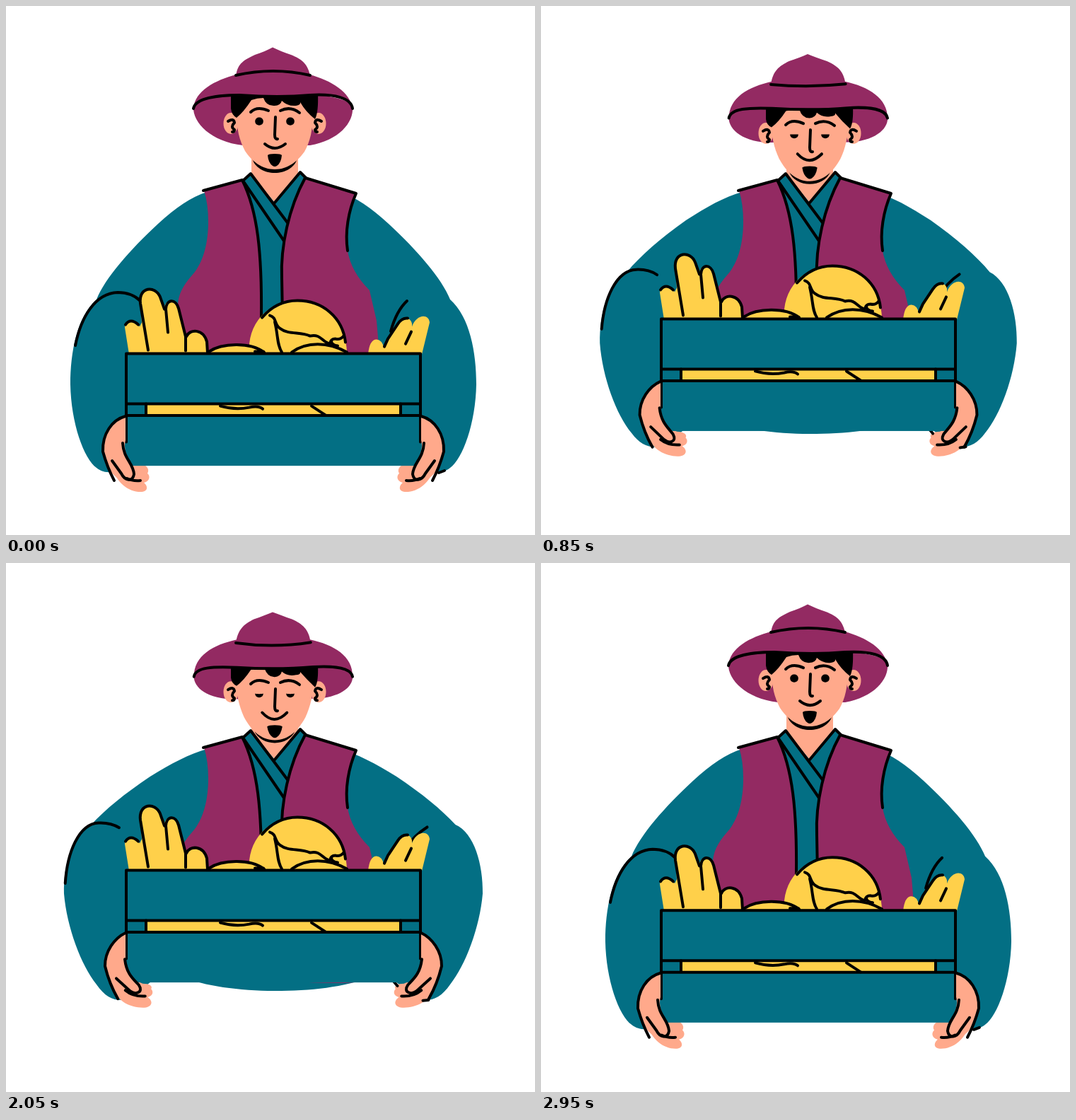
Write an HTML page with a canvas that moves like this. It is 748 by 748 pixels and loops after 3 s.

```html
<!DOCTYPE html>
<html lang="en">
<head>
<meta charset="utf-8">
<title>Farmer lifting a crate</title>
<style>
html, body { margin: 0; width: 100%; height: 100%; overflow: hidden; background: #fff; }
canvas { display: block; width: 748px; height: 748px; }
</style>
</head>
<body>
<canvas id="stage" width="748" height="748"></canvas>
<script>
const ctx = document.getElementById('stage').getContext('2d');
const TEAL = '#036f84', PLUM = '#932a62', SKIN = '#ffa98b', GOLD = '#ffd04a', INK = '#000';
const LOOP = 3000, STEP = 50, LIFT = 82;
let k = 0; // pose blend: 0 is low, a little over 1 is fully raised

// Blend two path strings with the same commands.
function mix(a, b) {
  const to = b.match(/-?[\d.]+/g);
  let i = 0;
  return a.replace(/-?[\d.]+/g, n => +n + (to[i++] - n) * k);
}
const path = (a, b) => new Path2D(b ? mix(a, b) : a);
function fill(color, a, b) {
  ctx.fillStyle = color;
  ctx.fill(path(a, b));
}
function line(a, b, w = 4) {
  ctx.lineWidth = w;
  ctx.stroke(path(a, b));
}
function shifted(dx, dy, draw) {
  ctx.save();
  ctx.translate(dx, dy);
  draw();
  ctx.restore();
}
function mirrored(sum, draw) {
  ctx.save();
  ctx.translate(sum, 0);
  ctx.scale(-1, 1);
  draw();
  ctx.restore();
}
function both(sum, draw) {
  draw();
  mirrored(sum, draw);
}

function arm() {
  fill(TEAL,
    'M284 263C262 270 240 285 215 308C175 345 140 385 128 415C100 440 91 490 91 535C92 590 110 640 128 653C138 661 148 660 165 658L205 630L300 600L300 264Z',
    'M284 263C258 270 232 283 200 300C165 320 140 337 118 355C92 362 78 405 79 445C84 490 105 545 128 577C142 599 155 607 175 604L212 574L300 530L300 264Z');
}

function creases() {
  line('M98 480C106 440 126 406 158 405Q178 405 190 417',
       'M79 444C80 400 95 356 122 355Q138 354 150 360');
  line('M567 417Q552 431 544 460', 'M605 359Q585 370 572 385');
}

function body() {
  fill(SKIN, 'M347 195H413V240L380 282L347 240Z');
  fill(TEAL, 'M282 264L335 247L346 237L380 278L416 235L424 243L490 266L480 400L515 585C480 600 430 605 380 605C330 605 280 598 248 585L280 400Z');
  line('M335 247L346 237L400 309M335 247L393 332M380 278L416 235L424 243');
  fill(PLUM, 'M280 261L334 246C356 290 362 350 361 440L349 592Q295 593 258 590Q231 586 231 575L243 425C243 403 256 389 267 376C279 360 286 335 286 305Q286 280 280 261Z');
  fill(PLUM, 'M423 243L495 265C484 290 479 320 483 346Q488 376 514 402L524 445L535 574Q530 594 470 594Q430 594 401 591L391 440L390 385C388 340 400 285 423 243Z');
  line('M279 261L334 246C356 290 362 350 361 440L349 591');
  line('M483 346C479 320 484 290 495 265L423 243C400 285 388 340 390 385L391 440L401 591');
}

function eye(x, y) {
  const open = k * 0.926 - 0.6;
  const lid = open < 0 ? Math.max(-7.5, 24 * open) : 9 * open;
  fill(INK, `M${x - 5.8} ${y}C${x - 5.8} ${y + 7.5} ${x + 5.8} ${y + 7.5} ${x + 5.8} ${y}C${x + 5.8} ${y + lid} ${x - 5.8} ${y + lid} ${x - 5.8} ${y}Z`);
}

function ear() {
  ctx.fillStyle = SKIN;
  ctx.beginPath();
  ctx.ellipse(318, 166, 10.5, 15, 0, 0, 7);
  ctx.fill();
}

function backBrim() {
  fill(PLUM,
    'M265 143C264 165 290 192 335 197L430 197C470 190 492 165 490 143C485 115 270 115 265 143Z',
    'M266 163C264 175 275 190 312 191L445 190C480 188 492 175 490 163C485 138 270 138 266 163Z');
}

function face() {
  fill(INK, 'M348 215C355 243 405 243 412 215Z', 'M352 244C362 266 398 266 408 244Z');
  shifted(0, 21.5 * k, () => both(760, ear));
  fill(SKIN,
    'M326 150C326 175 330 190 338 205C348 220 362 231 380 231C398 231 412 220 422 206C430 192 434 175 434 150L434 125L326 125Z',
    'M326 175C326 192 329 205 336 222C346 242 360 257 380 257C400 257 414 242 424 222C431 205 434 192 434 175L434 150L326 150Z');
  fill(INK,
    'M318 124L318 145Q319 154 326 158Q336 150 347 133Q355 130 364 130Q368 142 380 141Q388 141 390 134Q398 142 410 141Q417 140 416 136Q424 150 437 160Q442 150 441 124Z',
    'M318 152L318 168Q319 176 326 179Q336 172 346 157Q355 155 366 155Q370 168 380 168Q388 167 390 160Q398 167 410 164Q417 164 416 160Q426 170 437 181Q442 174 441 152Z');
  shifted(0, 21.5 * k, () => both(760, () => line('M314 163Q322 158 323 165Q317 171 323 175Q323 178 320 178')));
  shifted(0, 28 * k, () => {
    line('M346 150Q355 141 371 148M388 148Q402 141 415 151');
    line('M381 157L380 182Q380 189 384 188');
  });
  eye(358, 163 + 28.7 * k);
  eye(402, 163 + 28.7 * k);
  line('M366 195Q380 207 395 195', 'M361 217Q379 238 398 217');
  fill(INK,
    'M370 211Q371 209 380 209Q389 209 390 211Q389 222 383 226Q380 228 377 226Q371 222 370 211Z',
    'M369 238Q371 236 380 236Q389 236 391 238Q389 249 383 253Q380 255 377 253Q371 249 369 238Z');
}

function hat() {
  fill(PLUM,
    'M265 145C268 130 300 126 330 126C360 128 395 129 430 126C465 124 488 130 490 145C487 122 460 105 429 97L326 97C295 105 267 120 265 145Z',
    'M266 166C268 153 290 153 325 155C360 157 400 157 435 154C465 152 488 155 490 166C492 135 465 119 430 112L327 112C292 119 265 135 266 166Z');
  fill(PLUM,
    'M325 100C327 80 338 76 352 69C362 66 370 62 377 58.5C385 62 393 66 403 69C417 75 426 80 430 98Q378 100 325 100Z',
    'M325 118C328 98 336 90 350 83C360 79 370 76 377 73C385 76 395 79 405 83C420 90 429 98 431 117Q378 130 325 118Z');
  line('M325 98Q378 86 430 98', 'M325 118Q378 132 431 117');
  line('M265 145C268 130 300 126 330 126C360 128 395 129 430 126C465 124 488 130 490 145',
       'M266 166C268 153 290 153 325 155C360 157 400 157 435 154C465 152 488 155 490 166');
}

function vegetables() {
  fill(GOLD, 'M174 492L168 454C168 442 184 441 189 453L192 447L190 420C187 396 211 394 218 411L224 428C224 413 240 413 244 426L254 467C260 455 279 456 284 473L286 492Z');
  line('M169 450Q176 440 187 450');
  line('M201 486L190 420C187 396 211 394 218 411L224 428');
  line('M229 461L226 428C227 413 240 413 244 427L254 467L254 487M255 467C260 455 279 456 284 474L285 490');

  fill(GOLD, 'M512 492Q514 471 524 471Q532 472 534 482L553 450C560 436 576 439 574 453C580 435 598 434 599 447L588 492Z');
  line('M535 481L540 470L554 449Q560 440 568 441M573 460L565 477');

  fill(GOLD, 'M344 492C340 450 370 416 412 416C450 416 482 445 482 492Z');
  line('M362 440C375 425 390 416 412 416C448 416 476 440 480 475');
  line('M373 437C383 440 379 449 387 455C400 465 416 459 430 466C445 462 448 476 458 477Q459 470 466 470Q474 472 478 465M380 446C385 466 383 478 390 489M460 473Q460 479 469 480');
  fill(GOLD, 'M403 492C425 473 455 474 484 492Z');
  line('M404 489C425 474 455 474 482 489');
  fill(GOLD, 'M286 492C305 475 345 472 368 492Z');
  line('M287 488C305 476 345 474 365 489M352 488H364');
}

function crate() {
  ctx.fillStyle = TEAL;
  ctx.fillRect(170, 491, 416, 158.5);
  ctx.fillStyle = GOLD;
  ctx.fillRect(198, 562, 360, 16);
  line('M303 565Q324 571 344 567Q357 564 363 569M432 565L452 578');
  line('M198 562V578M558 562V578');
  line('M170 616V491H586V616M170 562H586M170 578.5H586');
}

function fingers() {
  fill(SKIN,
    'M150 650C155 675 175 688 192 687C202 686 200 678 195 674C204 672 204 664 200 661C204 654 198 648 185 645L165 640Z',
    'M153 588C160 603 180 611 200 609C211 606 209 598 202 594C210 592 210 586 207 583C209 579 204 577 196 578L170 565Z');
}

function palm() {
  fill(SKIN,
    'M169 580C150 585 136 605 137 630C140 650 150 665 165 672L178 671C184 664 180 652 176 645C170 635 166 625 169 614Z',
    'M169 504C155 512 141 530 141 550C146 575 155 590 168 598L190 590C198 585 194 578 188 574C178 568 172 556 169 540Z');
  line('M169 580C150 585 136 605 137 630Q143 652 153 671', 'M169 504C155 512 141 530 141 550Q147 576 160 598');
  line('M165 618C166 640 180 646 181 662C179 674 168 671 163 661L150 643',
       'M169 541C172 562 180 569 190 575C200 585 189 591 180 587L158 569');
  line('M171 668Q179 672 190 671', 'M168 583Q180 594 199 593');
}

function draw(ms) {
  const s = 1 - Math.abs(ms / (LOOP / 2) - 1);
  const p = s * s * (3 - 2 * s);
  const rise = 0.6 - LIFT * p;
  k = p / 0.926;
  ctx.fillStyle = '#fff';
  ctx.fillRect(0, 0, 748, 748);
  ctx.strokeStyle = INK;
  ctx.lineCap = ctx.lineJoin = 'round';
  backBrim();
  both(756, arm);
  body();
  creases();
  face();
  hat();
  both(756, fingers);
  line('M552 638L558 646', 'M545 574L552 582');
  shifted(0, rise, () => { vegetables(); crate(); });
  both(756, palm);
  line('M612 660L620 657', 'M582 605L590 605');
}

let start;
function tick(now) {
  start ??= now;
  draw(Math.floor(((now - start) % LOOP) / STEP) * STEP);
  requestAnimationFrame(tick);
}
draw(0);
requestAnimationFrame(tick);
</script>
</body>
</html>
```
